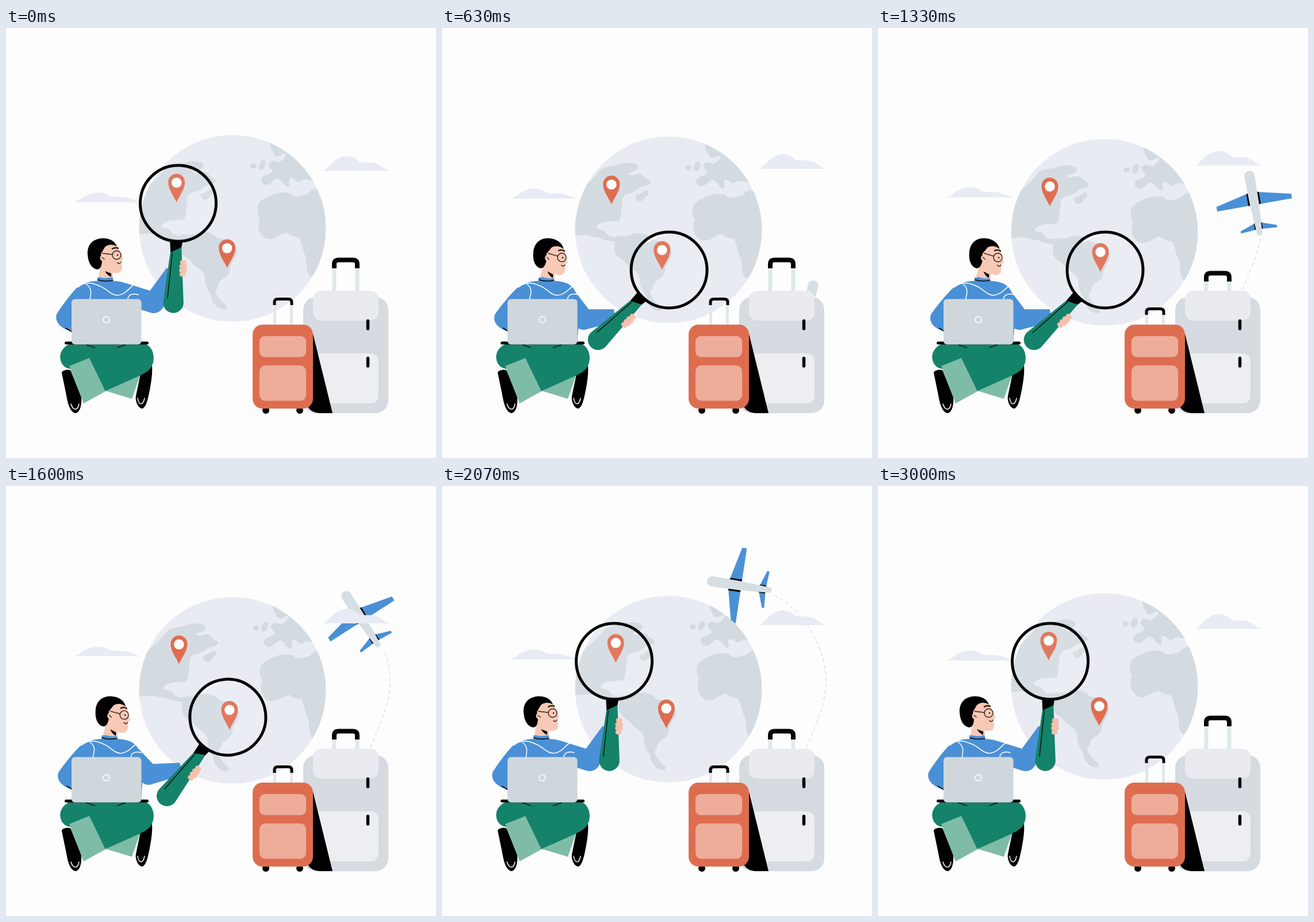
Animation, 748 px wide and 748 px high, one loop 3030 ms. Source, as an HTML page:

```html
<!DOCTYPE html>
<html lang="en">
<head>
<meta charset="utf-8">
<title>Travel planning</title>
<style>
  html, body { margin: 0; width: 100%; height: 100%; overflow: hidden; background: #fdfdfd; }
  svg { display: block; width: 100vw; height: 100vh; }
  .line { fill: none; stroke-linecap: round; stroke-linejoin: round; }
  .ink { stroke: #050505; }
  .white { stroke: #fff; stroke-width: 1.5; }
  .land { fill: #d4dbe0; }
  .blue { fill: #4a90d6; }
  .red { fill: #de6d50; }
  .pink { fill: #edad9a; }
  .skin { fill: #f8c9b6; }
  .green { fill: #15826a; }
  .mint { fill: #7fbca8; }
  .cloud { fill: #e8eaf4; }
</style>
</head>
<body>
<svg viewBox="0 0 748 748">
  <defs>
    <clipPath id="disc"><circle cx="394" cy="348.5" r="162.5"/></clipPath>
    <clipPath id="aboveCase"><rect width="748" height="467"/></clipPath>
    <mask id="reveal" maskUnits="userSpaceOnUse" x="0" y="0" width="748" height="748">
      <use href="#route" id="drawn" class="line" stroke="#fff" stroke-width="6"/>
    </mask>
    <path id="route" d="M634 455C650 415 668 380 668 340C668 270 610 172 508 172C480 172 455 180 435 198"/>
    <g id="pin">
      <path class="red" d="M0 0C-5 -12 -14.5 -22 -14.5 -35.5A14.5 14.5 0 0 1 14.5 -35.5C14.5 -22 5 -12 0 0Z"/>
      <circle cy="-34.5" r="8.8" fill="#fff"/>
    </g>
    <g id="wing">
      <path class="blue" d="M6 -18L66 -4V4L6 4Z"/>
      <path d="M7 -18L11 -17V4H7Z"/>
      <path class="blue" d="M3 35L32 45V49L3 47Z"/>
      <path d="M4 35L7 36V47H4Z"/>
    </g>
  </defs>

  <g id="trail" mask="url(#reveal)">
    <use href="#route" class="line" stroke="#ccd0e2" stroke-dasharray="6 5"/>
  </g>
  <g clip-path="url(#aboveCase)">
    <g id="plane">
      <use href="#wing"/>
      <use href="#wing" transform="scale(-1 1)"/>
      <path fill="#d7dee3" d="M-9 -47C-9 -59 9 -59 9 -47L8 5L4.5 56Q0 59 -4.5 56L-8 5Z"/>
    </g>
  </g>

  <path id="cloudL" class="cloud" d="M119 0C130 -4 134 -10 142 -13C152 -18 168 -19 177 -13C185 -7 195 -11 205 -9C220 -7 225 -2 234 0Z"/>
  <path id="cloudR" class="cloud" d="M552 0C562 -6 566 -14 576 -20C588 -28 604 -27 612 -18C618 -12 628 -16 640 -14C652 -10 660 -2 668 0Z"/>

  <g id="globe" clip-path="url(#disc)">
    <circle cx="394" cy="348.5" r="162.5" fill="#e9ebf3"/>
    <g id="land" class="land">
      <path d="M220 300L262 262L276 246C285 236 300 240 312 234C325 230 344 232 344 240C343 247 332 247 326 251C335 258 344 246 352 254C358 262 366 262 365 267C360 273 352 272 346 276C340 280 335 284 328 285C318 288 316 292 316 300C314 310 314 320 312 330C308 336 303 333 295 334C285 335 272 337 271 344C272 350 281 346 286 352C289 358 296 362 304 360V368C290 370 280 364 275 362C260 360 250 356 240 358L220 360Z"/>
      <path d="M338 289C346 288 354 280 360 279C364 284 361 290 356 291C352 300 344 302 340 295Z"/>
      <path d="M302 362C310 355 322 364 332 356C345 352 362 356 368 366C385 368 400 376 402 388C402 400 392 405 390 420C388 436 372 435 370 445C368 455 362 455 366 462C370 470 378 478 384 484C384 491 376 491 369 486C360 480 357 470 356 462C350 455 346 445 346 432C344 420 330 418 324 408C318 400 302 395 302 382Z"/>
      <path d="M458 196L462 212C468 216 464 224 472 223C476 226 482 216 488 220C482 232 474 236 470 232C460 228 452 238 460 244C468 250 460 254 452 256C442 260 442 270 452 273C462 274 464 264 472 262C480 262 482 272 490 276C498 276 490 266 494 262C500 258 502 266 510 268C516 262 522 262 534 266L565 240L490 180Z"/>
      <ellipse cx="431" cy="240" rx="5.5" ry="4.5"/>
      <ellipse cx="446" cy="238" rx="5.5" ry="9" transform="rotate(20 446 238)"/>
      <path d="M438 310C440 300 452 296 460 292C470 286 484 284 496 288C500 296 510 292 520 290C530 288 528 280 540 280L565 290V440L530 432C522 425 524 410 522 398C516 388 516 376 510 364C500 364 495 360 488 356C478 358 465 372 452 366C440 358 436 346 442 330C436 322 438 316 438 310Z"/>
    </g>
  </g>
  <g id="pins">
    <use href="#pin" x="297" y="303.5"/>
    <use href="#pin" x="385" y="417.5"/>
  </g>

  <g id="bigCase">
    <g id="bigHandle" class="line">
      <path stroke="#dfe8ea" stroke-width="7" d="M571 412V490M611 412V490"/>
      <path class="ink" stroke-width="8" stroke-linecap="butt" d="M571 418V411Q571 403.500 579 403.500H603Q611 403.500 611 411V418" style="stroke-linecap:butt"/>
    </g>
    <rect x="517" y="468" width="148" height="202" rx="22" fill="#d5dbe0"/>
    <rect x="534" y="457" width="114" height="52" rx="14" fill="#e9ebf0"/>
    <rect x="520" y="566" width="128" height="87" rx="13" fill="#eceef2"/>
    <path d="M534 532L568 670H545C532 669 525 662 522 652Z"/>
    <path class="line ink" stroke-width="5.500" d="M629.500 509.500V523M629.500 574.500V588"/>
  </g>
  <g id="smallCase">
    <g id="smallHandle" class="line">
      <path stroke="#dfe8ea" stroke-width="5" d="M467.500 480V540M496.500 480V540"/>
      <path class="ink" stroke-width="5" d="M467 482V477Q467 471.500 473 471.500H491Q497 471.500 497 477V482" style="stroke-linecap:butt"/>
    </g>
    <circle cx="452" cy="665" r="6"/><circle cx="511" cy="665" r="6"/>
    <rect class="red" x="429" y="516" width="105" height="146" rx="17"/>
    <rect class="pink" x="441" y="536" width="81" height="36.500" rx="9"/>
    <rect class="pink" x="441" y="587" width="81" height="61.500" rx="10"/>
  </g>

  <g id="legs">
    <path d="M97 600C96 595 112 592 113 597L131 642C132 655 129 669 121 670C110 668 107 650 104 634Z"/>
    <path d="M254 588C254 585 238 587 236 592L226 640C224 650 231 662 237 662C244 660 247 645 250 630C253 614 255 600 254 588Z"/>
    <path class="line white" d="M113 654C116 664 124 668 127 654M229 644C231 656 238 658 241 644"/>
    <path class="mint" d="M173 632L234 602L219 645L176 632Z"/>
    <path class="green" d="M112 549H240C257 553 260 575 254 587C250 597 240 601 230 606L170 633L135 600L108 592C92 588 86 560 112 549Z"/>
    <path class="mint" d="M110 588L145 574L173 632L135 653Z"/>
    <path class="line ink" stroke-width="1.300" d="M140 551Q147 553 154 556M194 556Q201 553 208 551"/>
  </g>

  <g id="torso">
    <path class="blue" d="M159 434Q172 431 186 434V440C202 440 214 445 222 454L235 480V550H114V528C96 523 84 512 88 498C98 482 110 466 122 453C132 444 146 440 159 440Z"/>
    <path class="line ink" stroke-width="1.500" d="M160 438Q172 442 186 439M104 522L114 528"/>
  </g>
  <path id="upperArm" class="line" stroke="#4a90d6" stroke-width="36"/>
  <path id="foreArm" class="blue"/>
  <g id="folds" class="line white">
    <path d="M125 451C136 441 150 443 161 448C176 453 180 464 194 465C208 464 214 452 222 447M140 446C150 453 148 462 146 472M212 472C212 463 222 461 230 464"/>
  </g>

  <g id="head">
    <path class="skin" d="M164 412H185L186 433Q172 437 161 433Z"/>
    <path d="M172 423L183 427V433Q176 430 172 423Z"/>
    <path class="skin" d="M164 383L186 374C192 377 196 383 198 388L204 402L201 406L202 418Q201 426 192 426C180 426 172 420 166 410Z"/>
    <path d="M193 380C188 368 176 365 165 366C148 368 141 380 142 394C143 410 150 419 159 420C166 419 167 410 167 403L165 393L172 381C178 376 186 376 193 380Z"/>
    <circle class="skin" cx="169" cy="400" r="5.500"/>
    <g class="line" stroke="#2b211a" stroke-width="1.400">
      <circle cx="192.500" cy="395" r="7.500"/>
      <path d="M185 394L168 392M167 399L171 402M200 407Q197 412 194 408"/>
      <path stroke-width="2.500" d="M185 384Q190 381 195 383"/>
    </g>
    <circle cx="194" cy="395" r="1.200"/>
  </g>

  <path class="line ink" stroke-width="5" d="M104.500 548H245.500"/>
  <rect x="114" y="471.500" width="121.500" height="79" rx="6" fill="#cfd7dc"/>
  <circle class="line white" cx="174.500" cy="507.500" r="5.500"/>

  <g id="glass">
    <path d="M-11 65H11L9 80L-9 88Z"/>
    <path class="green" d="M-9.500 86L9.500 76L17.800 173A17.800 18 0 1 1 -17.800 173Z"/>
    <path class="line ink" stroke-width="1.300" d="M-6 86L-10.500 166"/>
    <circle r="66" fill="#fff" fill-opacity=".08" class="ink" stroke-width="5"/>
    <path class="line" stroke="#fff" stroke-width="2.500" d="M-61 -8A61.500 61.500 0 0 1 -49 -37"/>
    <g class="line" stroke="#f5c0ac" stroke-width="7.500">
      <path d="M12 102L15.500 102M11 109L17 109M11 116L17 116M12 123L15 123"/>
    </g>
  </g>
</svg>
<script>
const LOOP = 3030;
const $ = id => document.getElementById(id);
const place = (id, x, y, angle = 0) =>
  $(id).setAttribute('transform', `translate(${x} ${y}) rotate(${angle})`);
const mix = (a, b, p) => a + (b - a) * p;
const ease = (t, from, to) => {
  const x = Math.min(1, Math.max(0, (t - from) / (to - from)));
  return x * x * (3 - 2 * x);
};
const pulse = (t, a, b, c, d) => ease(t, a, b) - ease(t, c, d);
const wave = (t, peak) => Math.cos(2 * Math.PI * (t - peak) / LOOP);

// Smooth curve through rows of [time, ...values]
function track(keys, t) {
  const last = keys.length - 1;
  if (t <= keys[0][0]) return keys[0].slice(1);
  if (t >= keys[last][0]) return keys[last].slice(1);
  const i = keys.findIndex(k => k[0] > t) - 1;
  const [a, b] = [keys[i], keys[i + 1]];
  const slope = (j, n) => {
    const p = keys[Math.max(0, j - 1)], q = keys[Math.min(last, j + 1)];
    return (q[n] - p[n]) / (q[0] - p[0]);
  };
  const span = b[0] - a[0], u = (t - a[0]) / span, v = 1 - u;
  return a.slice(1).map((_, m) => {
    const n = m + 1;
    return v * v * (1 + 2 * u) * a[n] + u * u * (3 - 2 * u) * b[n]
      + span * u * v * (v * slope(i, n) - u * slope(i + 1, n));
  });
}

const flight = [[500, 628, 530, 14], [930, 649, 412, 9], [1330, 654.5, 304, -10],
  [1830, 574, 187, -55], [2370, 446, 190, -112], [3030, 350, 330, -150]];
const trailLength = [[900, 0], [1330, 97], [1830, 240], [2370, 372], [2700, 460]];

function drawArm(p) {
  const bend = p * (1 - p);
  const lensX = mix(299.5, 395, p + 0.58 * bend);
  const lensY = mix(305, 421, p + (1.48 * p - 1.08) * bend);
  const angle = mix(2.8, 45.5, p);
  place('glass', lensX, lensY, angle);

  const rad = angle * Math.PI / 180;
  const wristX = lensX - 113 * Math.sin(rad) - mix(5, 14, p);
  const wristY = lensY + 113 * Math.cos(rad) + mix(5, 0, p);
  const elbowX = mix(257, 246, p), elbowY = mix(478, 507, p);
  $('upperArm').setAttribute('d', `M${mix(203, 211, p)} 461L${elbowX} ${elbowY}`);

  const dx = wristX - elbowX, dy = wristY - elbowY, len = Math.hypot(dx, dy);
  const nx = -dy / len, ny = dx / len;
  const side = (x, y, r) => `${x + nx * r} ${y + ny * r}`;
  $('foreArm').setAttribute('d', `M${side(elbowX, elbowY, 18)}L${side(wristX, wristY, 11)}` +
    `L${side(wristX, wristY, -11)}L${side(elbowX, elbowY, -18)}Z`);

  const k = 9 * p / 113;
  for (const id of ['torso', 'folds'])
    $(id).setAttribute('transform', `matrix(1 0 ${-k} 1 ${550 * k} 0)`);
  $('head').setAttribute('transform', `translate(${9 * p} 0) rotate(${10 * p} 172 437)`);
}

function draw(t) {
  const rise = 3.5 - 3.5 * wave(t, 0);
  const drift = 1.5 + 3.8 * wave(t, 2030);
  place('globe', 0, rise);
  place('land', drift, 0);
  place('pins', drift, 3.3 + 3.4 * wave(t, 1400));
  place('cloudL', 0, 299.5 + 5.5 * wave(t, 2650));
  place('cloudR', 0, 243.75 + 4.75 * wave(t, 0));

  place('plane', ...track(flight, t));
  $('drawn').setAttribute('stroke-dasharray', `${track(trailLength, t)[0]} 999`);
  $('trail').setAttribute('opacity', t < 900 ? 0 : 1 - ease(t, 2500, 2900));

  place('bigHandle', 0, 23 * pulse(t, 745, 1245, 2450, 2950));
  place('smallHandle', 0, 17 * pulse(t, 930, 1330, 2550, 2990));
  drawArm(pulse(t, 0, 500, 1465, 1965));
}

const start = performance.now();
function tick() {
  draw((performance.now() - start) % LOOP);
  requestAnimationFrame(tick);
}
tick();
</script>
</body>
</html>
```
